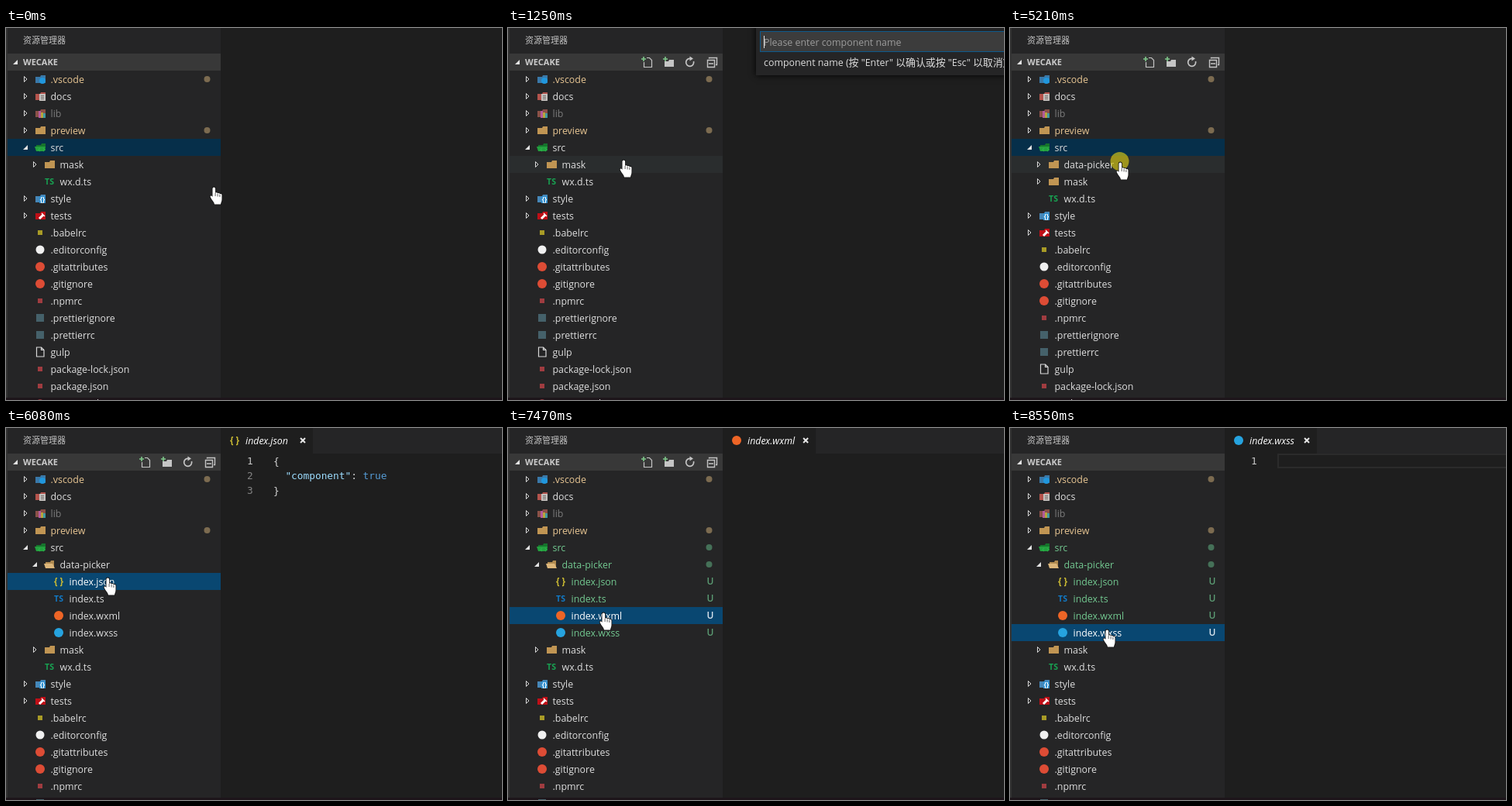
Recreate the animation shown at these times as an HTML page with a canvas. Size 640 by 480 pixels, loop 9090 ms.

```html
<!DOCTYPE html>
<html lang="zh">
<head>
<meta charset="utf-8">
<style>
  html, body { margin: 0; width: 100%; height: 100%; overflow: hidden; background: #1e1e1e; }
  canvas { display: block; }
</style>
</head>
<body>
<canvas width="640" height="480"></canvas>
<script>
const ctx = document.querySelector('canvas').getContext('2d');
const LOOP = 9090, ROW = 22, TREE_TOP = 55;
const LATIN = '"Open Sans", "Noto Sans", sans-serif';
const CJK = '"Noto Sans CJK SC", "Noto Sans CJK", sans-serif';
const MONO = '"DejaVu Sans Mono", monospace';
const UNTRACKED = '#73c991', MODIFIED = '#e8c693', PLAIN = '#dedede';

// Tracks: [time, value], each value holds until the next
const selection = [[0, 'src'], [1090, ''], [5140, 'src'], [5290, 'data-picker'], [5920, 'index.json'],
  [6690, 'index.ts'], [7300, 'index.wxml'], [8310, 'index.wxss']];
const openTab = [[0, ''], [6000, 'index.json'], [6770, 'index.ts'], [7400, 'index.wxml'], [8390, 'index.wxss']];
const editorLines = [[0, []], [6070, ['{', '  "component": true', '}']], [6770, []], [7630, ['']], [8390, []], [8550, ['']]];
const typing = [1710, 1960, 2110, 2260, 2720, 2890, 3030, 3110, 3260, 3350];
const clicks = [5140, 5920, 6690, 7300, 8310];
const pointer = [[70, 264, 205], [560, 141, 147], [800, 141, 147], [940, 145, 170], [4890, 145, 170],
  [4970, 138, 173], [5590, 138, 173], [5750, 127, 193], [6200, 127, 193], [6310, 126, 212],
  [6930, 126, 212], [7200, 119, 238], [7600, 119, 238], [7860, 121, 260]];

const valueAt = (track, t) => track.filter(([start]) => start <= t).pop()[1];
const between = (t, from, to) => t >= from && t < to;

function pointerAt(t) {
  const next = pointer.findIndex(([time]) => time > t);
  if (next === 0) return pointer[0].slice(1);
  if (next < 0) return pointer.at(-1).slice(1);
  const [t0, x0, y0] = pointer[next - 1], [t1, x1, y1] = pointer[next];
  const p = (t - t0) / (t1 - t0), k = p * p * (3 - 2 * p);
  return [Math.round(x0 + (x1 - x0) * k), Math.round(y0 + (y1 - y0) * k)];
}

// Drawing helpers
function rect(x, y, w, h, color) {
  ctx.fillStyle = color;
  ctx.fillRect(x, y, w, h);
}
function disc(x, y, r, color) {
  ctx.fillStyle = color;
  ctx.beginPath();
  ctx.arc(x, y, r, 0, 7);
  ctx.fill();
}
function fill(d, color) {
  ctx.fillStyle = color;
  ctx.fill(new Path2D(d));
}
function stroke(d, color, width = 1) {
  ctx.strokeStyle = color;
  ctx.lineWidth = width;
  ctx.stroke(new Path2D(d));
}
function shifted(x, y, draw) {
  ctx.save();
  ctx.translate(x, y);
  draw();
  ctx.restore();
}
// Draws Latin and Chinese runs in their own fonts and returns the end position
function text(str, x, y, color, { size = 12.4, style = '', family = LATIN } = {}) {
  ctx.fillStyle = color;
  for (const run of str.match(/[一-鿿]+|[^一-鿿]+/g) || []) {
    const chinese = run > '一';
    ctx.font = `${style} ${chinese ? size * 1.04 : size}px ${chinese ? CJK : family}`;
    ctx.fillText(run, x, y);
    x += ctx.measureText(run).width;
  }
  return x;
}
function label(str, color, size = 11, style = 'bold') {
  ctx.textAlign = 'center';
  text(str, 0, size * 0.36, color, { size, style });
  ctx.textAlign = 'left';
}

// Icons, drawn around their centre
const folder = color => fill('M-6 5V-3H0L1 -5H7V5Z', color);
function openFolder(back, front) {
  fill('M-5 5V-3H1L2 -5H6V5Z', back);
  fill('M-7 -1H4L7 5H-5Z', front);
}
const square = (size, color) => () => rect(-size / 2, -size / 2, size, size, color);
const circle = (r, color) => () => disc(0, 0, r, color);
const icons = {
  folder: () => folder('#c09553'),
  openFolder: () => openFolder('#b08a50', '#dcb67a'),
  vscode() { folder('#3a78a8'); disc(3, 2, 4, '#2196dc'); },
  docs() {
    folder('#b4534c');
    rect(-1, -3, 8, 9, '#c4c0bd');
    stroke('M1 -.5H5M1 1.5H5M1 3.5H5', '#77706e');
  },
  lib() {
    folder('#8b5148');
    rect(-2, -3, 3, 9, '#b35b9b');
    rect(1, -1, 3, 7, '#b7a53c');
    rect(4, 0, 3, 6, '#3f9aa2');
  },
  src() {
    fill('M-5 4V-3H1L2 -5H7V4Z', '#16752c');
    fill('M-7 -1H7L5 5H-5Z', '#23a03e');
    stroke('M0 1L-2 3L0 5M4 1L6 3L4 5', '#2bb04a', 1.4);
  },
  style() { folder('#4687b8'); rect(-1, -3, 8, 9, '#2f8fd0'); shifted(3, 1, () => label('{}', '#fff', 8)); },
  tests() { folder('#bf0f17'); stroke('M-1 4L4 -1', '#fff', 3); stroke('M2 -3L6 1', '#fff', 1.2); },
  ts: () => label('TS', '#18a352', 10.5),
  tsBlue: () => label('TS', '#1279c4', 10.5),
  json: () => label('{ }', '#cbbb33', 11.5),
  wxml: circle(6, '#ee6526'),
  wxss: circle(6, '#26a3df'),
  babel: square(6, '#a89b26'),
  editor: circle(5.5, '#f0f0f0'),
  git: circle(6, '#dd4c35'),
  npm: square(6, '#a03c40'),
  prettier: square(10, '#45616a'),
  page: () => stroke('M-4.5 -6H1.5L5 -2.5V6H-4.5ZM1.5 -6V-2.5H5', '#d8d8d8', 1.2),
  note: circle(5, '#8c3a3f')
};
const fileIcon = { json: 'json', ts: 'tsBlue', wxml: 'wxml', wxss: 'wxss' };
const iconFor = name => icons[fileIcon[name.split('.').pop()]];

// Each row: [depth, name, icon, arrow, status]; arrow is 'closed' or 'open'
function treeRows(t) {
  const tracked = t >= 6150 ? 'U' : '';
  const expanded = t >= 5290;
  const picker = t < 4510 ? [] : [
    [1, 'data-picker', expanded ? 'openFolder' : 'folder', expanded ? 'open' : 'closed', tracked],
    ...(expanded ? Object.entries(fileIcon) : []).map(([ext, icon]) => [2, 'index.' + ext, icon, '', tracked])
  ];
  const files = { '.babelrc': 'babel', '.editorconfig': 'editor', '.gitattributes': 'git', '.gitignore': 'git',
    '.npmrc': 'npm', '.prettierignore': 'prettier', '.prettierrc': 'prettier', 'gulp': 'page',
    'package-lock.json': 'npm', 'package.json': 'npm', 'project.md': 'note' };
  return [
    [0, '.vscode', 'vscode', 'closed', 'M'],
    [0, 'docs', 'docs', 'closed'],
    [0, 'lib', 'lib', 'closed', 'ignored'],
    [0, 'preview', 'folder', 'closed', 'M'],
    [0, 'src', 'src', 'open', tracked],
    ...picker,
    [1, 'mask', 'folder', 'closed'],
    [1, 'wx.d.ts', 'ts'],
    [0, 'style', 'style', 'closed'],
    [0, 'tests', 'tests', 'closed'],
    ...Object.entries(files).map(([name, icon]) => [0, name, icon])
  ];
}

function drawArrow(x, y, arrow) {
  shifted(x, y, () => {
    if (arrow === 'open') fill('M3 -3V3H-3Z', '#e4e4e4');
    if (arrow === 'closed') stroke('M-1.5 -3.5L2 0L-1.5 3.5Z', '#d8d8d8');
  });
}

function drawTree(t, hoverRow) {
  const selected = valueAt(selection, t);
  const colors = { U: UNTRACKED, M: MODIFIED, ignored: '#7c7c7c' };
  treeRows(t).forEach(([depth, name, icon, arrow, status], i) => {
    const top = TREE_TOP + i * ROW, mid = top + ROW / 2, indent = depth * 12;
    const active = name === selected && name !== 'src';
    if (active) rect(2, top, 275, ROW, '#094771');
    else if (name === selected) rect(2, top, 275, ROW, '#062f4a');
    else if (i === hoverRow) rect(2, top, 275, ROW, '#2a2d2e');

    const color = active ? '#fff' : colors[status] || PLAIN;
    drawArrow(25 + indent, mid, arrow);
    shifted(44 + indent, mid, icons[icon]);
    text(name, 57.5 + indent, mid + 5, color);
    if (status === 'M') disc(259.5, mid, 4, '#7c6b50');
    if (status === 'U' && arrow) disc(259.5, mid, 4, '#457158');
    if (status === 'U' && !arrow) shifted(261, mid, () => label('U', active ? '#dce6ee' : '#5c9d74', 12, '600'));
  });
}

function drawToolbar() {
  const plus = (x, y) => stroke(`M${x - 3} ${y}h6M${x} ${y - 3}v6`, '#7fc98a', 1.6);
  const line = '#c5c5c5';
  stroke('M175.5 44V50.5H185.5V41.5L182.5 38.5H179', line, 1.2);
  plus(175, 40);
  fill('M202 50V43H207L208 41H214V50Z', line);
  plus(203, 40);
  stroke('M236 39.5A5 5 0 1 0 239.5 43', line, 1.7);
  fill('M234.5 36.5L239 39.5L234.5 42.5Z', line);
  stroke('M257.5 41.5H266.5V50.5H257.5ZM259 46H265M259.5 39.5V38.5H269.5V47.5H268', line, 1.4);
}

function drawSidebar(t, hovered, tipY) {
  rect(0, 0, 2, 480, '#333333');
  rect(2, 0, 275, 480, '#252526');
  rect(0, 477, 640, 3, '#1d151a');
  text('资源管理器', 22, 20, '#c4c4c4', { size: 10.6 });
  rect(2, 33, 275, ROW, '#383838');
  drawArrow(12, 44, 'open');
  text('WECAKE', 22, 48, '#cccccc', { size: 11, style: 'bold' });
  drawTree(t, hovered ? Math.floor((tipY - TREE_TOP) / ROW) : -1);
  if (hovered) drawToolbar();
}

function drawEditor(t) {
  rect(0, 0, 640, 480, '#1e1e1e');
  const name = valueAt(openTab, t);
  if (!name) return;
  ctx.font = `italic 12.4px ${LATIN}`;
  const closeX = Math.max(383, 309 + ctx.measureText(name).width + 14);
  rect(closeX + 13, 0, 640, 33, '#252526');
  shifted(295, 16, iconFor(name));
  text(name, 309, 21, '#fff', { style: 'italic' });
  shifted(closeX, 16, () => stroke('M-3 -3L3 3M3 -3L-3 3', '#e8e8e8', 2));

  const lines = valueAt(editorLines, t);
  if (lines.length === 1) {
    ctx.strokeStyle = '#2b2b2b';
    ctx.lineWidth = 2;
    ctx.strokeRect(346, 34, 300, 17);
  }
  lines.forEach((line, i) => {
    const y = 47 + i * 19, style = { size: 12.8, family: MONO };
    text(String(i + 1), 311, y, i ? '#858585' : '#c6c6c6', style);
    let x = 345;
    for (const part of line.match(/"\w+"|true|[^"t]+/g) || [])
      x = text(part, x, y, part[0] === '"' ? '#9cdcfe' : part === 'true' ? '#569cd6' : '#d4d4d4', style);
  });
}

function drawPrompt(t) {
  if (!between(t, 1090, 3810)) return;
  ctx.save();
  ctx.shadowColor = '#000';
  ctx.shadowBlur = 8;
  rect(320, -6, 340, 67, '#252526');
  ctx.restore();
  rect(325, 4, 330, 27, '#3c3c3c');
  ctx.strokeStyle = '#0e5a8c';
  ctx.lineWidth = 1;
  ctx.strokeRect(325.5, 4.5, 330, 26);
  const typed = 'dataPicker'.slice(0, typing.filter(time => time <= t).length);
  if (!typed) text('Please enter component name', 330, 23, '#9c9c9c');
  const caret = text(typed, 330, 23, PLAIN);
  rect(Math.round(caret), 10, 1, 16, '#e8e8e8');
  text('component name (按 "Enter" 以确认或按 "Esc" 以取消)', 330, 49, PLAIN);
}

function drawTooltip(x, y, file, alpha) {
  ctx.save();
  ctx.globalAlpha = alpha;
  rect(x, y, 660, 21, '#767676');
  rect(x + 1, y + 1, 660, 19, '#f2f2f2');
  const path = 'D:\\Users\\Lena\\Documents\\projects\\schoolpal\\@schoolpal\\wecake\\src\\data-picker\\';
  text(path + file + ' • Untracked', x + 5, y + 15, '#222', { size: 11.5 });
  ctx.restore();
}

function drawPointer(x, y) {
  shifted(x - 1, y, () => {
    const hand = 'M3.5 13V2.2a1.8 1.8 0 0 1 3.6 0V8a1.6 1.6 0 0 1 3 .6a1.6 1.6 0 0 1 2.8 .8' +
      'a1.5 1.5 0 0 1 2.6 1V16c0 3-1.2 4-1.5 6.5H6C5.6 19.5 2.6 17 .8 13.2c-.7-1.8 1-2.4 2.7-.4z';
    stroke(hand, '#111', 1.6);
    fill(hand, '#fff');
    stroke('M7.1 8V12M10.1 9V12.5M12.9 10V13', '#333', 0.8);
  });
}

function draw(t) {
  const [x, y] = pointerAt(t);
  drawEditor(t);
  drawSidebar(t, between(t, 70, 8310), y);
  drawPrompt(t);
  if (between(t, 6540, 6930)) drawTooltip(129, 237, 'index.json', t < 6690 ? 1 : t < 6860 ? 0.75 : 0.42);
  if (between(t, 8240, 8470)) drawTooltip(125, 285, 'index.wxss', t < 8390 ? 1 : 0.42);
  if (clicks.some(time => between(t, time, time + 150))) disc(x + 3.5, y - 1, 12, 'rgba(220, 205, 20, .65)');
  drawPointer(x, y);
}

const start = performance.now();
function tick() {
  draw((performance.now() - start) % LOOP);
  requestAnimationFrame(tick);
}
tick();
</script>
</body>
</html>
```
